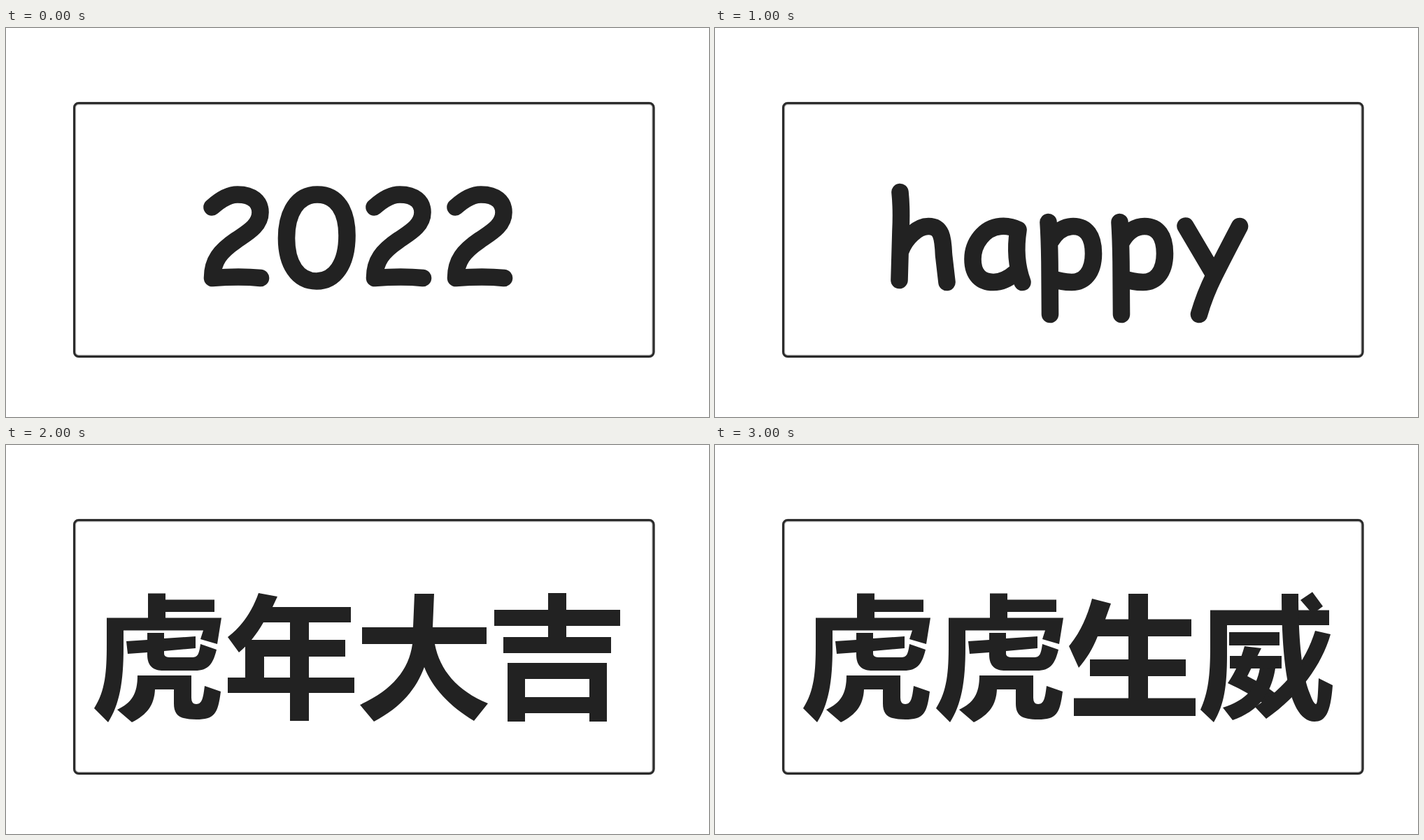
These frames come from a looping animation (1005 by 557 pixels, 4000 ms). An HTML page:

```html
<!DOCTYPE html>
<html lang="zh">
<head>
<meta charset="utf-8">
<title>2022 happy 虎年大吉</title>
<style>
  html, body { margin: 0; width: 100%; height: 100%; overflow: hidden; background: #fff; }
  svg { display: block; width: 100%; height: 100%; }
  .pen { fill: none; stroke: #222; stroke-width: 24.6; stroke-linecap: round; stroke-linejoin: round; }
  .solid { fill: #222; }
</style>
</head>
<body>
<svg viewBox="0 0 1005 557" role="img">
  <rect x="98" y="108" width="827.5" height="362" rx="6" fill="#fff" stroke="#b4b4b4" stroke-width="4.4"/>
  <rect x="97.5" y="107.5" width="828.5" height="363" rx="6.5" fill="none" stroke="#2b2b2b" stroke-width="3"/>
  <g id="word"></g>
</svg>
<script>
const SLIDE_MS = 1000;

// Rounded letters are pen strokes; Han characters are filled outlines.
const glyphs = {
  two: 'M294.5 256.5C305 247 317 238.5 331 238.5C352 238.5 363.5 249 363.5 264C363.5 283 345 293 329 304C307 319 295 333 295 358Q335 355 364 358',
  zero: 'M445 238.5C474 238.5 487.5 263 487.5 297C487.5 338 470 362.5 444 362.5C417 362.5 401 338 401 301C401 264 417 238.5 445 238.5Z',
  h: 'M264.5 235Q267 260 265.5 290L263.5 361M265 320C272 300 290 284 305 284C324 284 326 300 327 325L331.5 364',
  a: 'M433.5 289C424 284 414 283.5 408 284C385 286 368.5 308 368.5 331C368.5 353 380 364 398 364C412 364 422 357 430 350M433.5 289Q427 330 439.5 364',
  p: 'M476.5 278Q478 300 478.5 335L479 410M480 305C488 291 500 284 512 284C531 284 541 298 541 323C541 350 528 364 510 364Q495 364 480 358',
  y: 'M672.5 283.5L714 354M750 284Q728 326 714 354T692 410',
  tiger: 'M203 212.5H228V221.5H298V239H228V248H203Z' +
    'M144 247.5H308L302 285L278 278L282 265.5H168V290C168 340 162 372 146 397L126 377C142 352 144 325 144 285Z' +
    'M172 281L202 279V269H226V277L271 274V291L226 295V298C226 302 228 304 236 304H266C274 304 276 300 278 285L301 293C296 313 290 323 270 323H225C212 323 202 318 202 300V297L174 299Z' +
    'M188 330H265V362Q265 371 272 371C281 371 282 360 284 345L307 353C303 385 298 393 272 393C248 393 240 387 240 370V350H213C212 372 202 386 180 397L159 379C180 369 188 356 188 330Z',
  year: 'M361 212L388 217L381 232H493V254H433V279H485V303H433V333H498V355H433V395H406V355H317V333H342V279H406V254H368C358 272 346 286 333 297L317 275C337 260 352 238 361 212Z' +
    'M369 303V333H406V303Z',
  big: 'M584 213H612L610 261H687V285H613C620 322 645 352 689 370L669 395C634 374 609 347 598 318C587 348 566 375 526 396L506 372C552 351 576 322 581 285H509V261H582Z',
  luck: 'M775 212H801V236H878V259H801V275H865V298H711V275H775V259H698V236H775Z' +
    'M717 312H859V396H834V384H742V396H717ZM742 335V361H834V335Z',
  life: 'M539 220L566 227L558 249.5H591V213H619V249.5H681V274H619V307H673V331H619V362.5H687V388H513V362.5H591V331H536V307H591V274H547C540 292 531 306 520 319L506 288C521 270 532 247 539 220Z',
  might: [
    'M708 236.5H878V258H732V300C732 345 728 372 713 397L694 379C705 355 708 330 708 290Z',
    'M735 268H807V287H735Z',
    'M736 302H810V320H736Z',
    'M757 288L781 291L761 331C775 338 790 347 803 357L790 375C774 362 753 350 733 341C744 325 752 306 757 288Z',
    'M779 319L801 320C795 358 775 382 740 394L726 376C757 366 774 350 779 319Z',
    'M858 266L880 271C867 316 836 358 788 392L772 375C815 348 844 311 858 266Z',
    'M810 213H834C834 275 838 325 850 355C854 366 857 371 859 371C862 371 862 352 863 334L883 344C880 385 872 396 857 396C836 396 824 368 818 335C812 300 810 260 810 213Z',
    'M837 222L854 210.5L869 231L861 237H850Z'
  ]
};

const glyph = (kind, name, dx = 0) => [].concat(glyphs[name])
  .map(d => `<path class="${kind}" transform="translate(${dx})" d="${d}"/>`).join('');
const pen = (name, dx) => glyph('pen', name, dx);
const solid = (name, dx) => glyph('solid', name, dx);

const slides = [
  ['2022', pen('two') + pen('zero') + pen('two', 232) + pen('two', 348)],
  ['happy', pen('h') + pen('a') + pen('p') + pen('p', 102) + pen('y')],
  ['虎年大吉', solid('tiger') + solid('year') + solid('big') + solid('luck')],
  ['虎虎生威', solid('tiger') + solid('tiger', 190) + solid('life') + solid('might')]
];

const svg = document.querySelector('svg');
const word = document.getElementById('word');
const start = performance.now();
let shown = -1;

function draw(ms) {
  const index = Math.floor(ms / SLIDE_MS) % slides.length;
  if (index === shown) return;
  shown = index;
  const [label, art] = slides[index];
  svg.setAttribute('aria-label', label);
  word.innerHTML = art;
}

function tick() {
  draw(performance.now() - start);
  requestAnimationFrame(tick);
}
tick();
</script>
</body>
</html>
```
